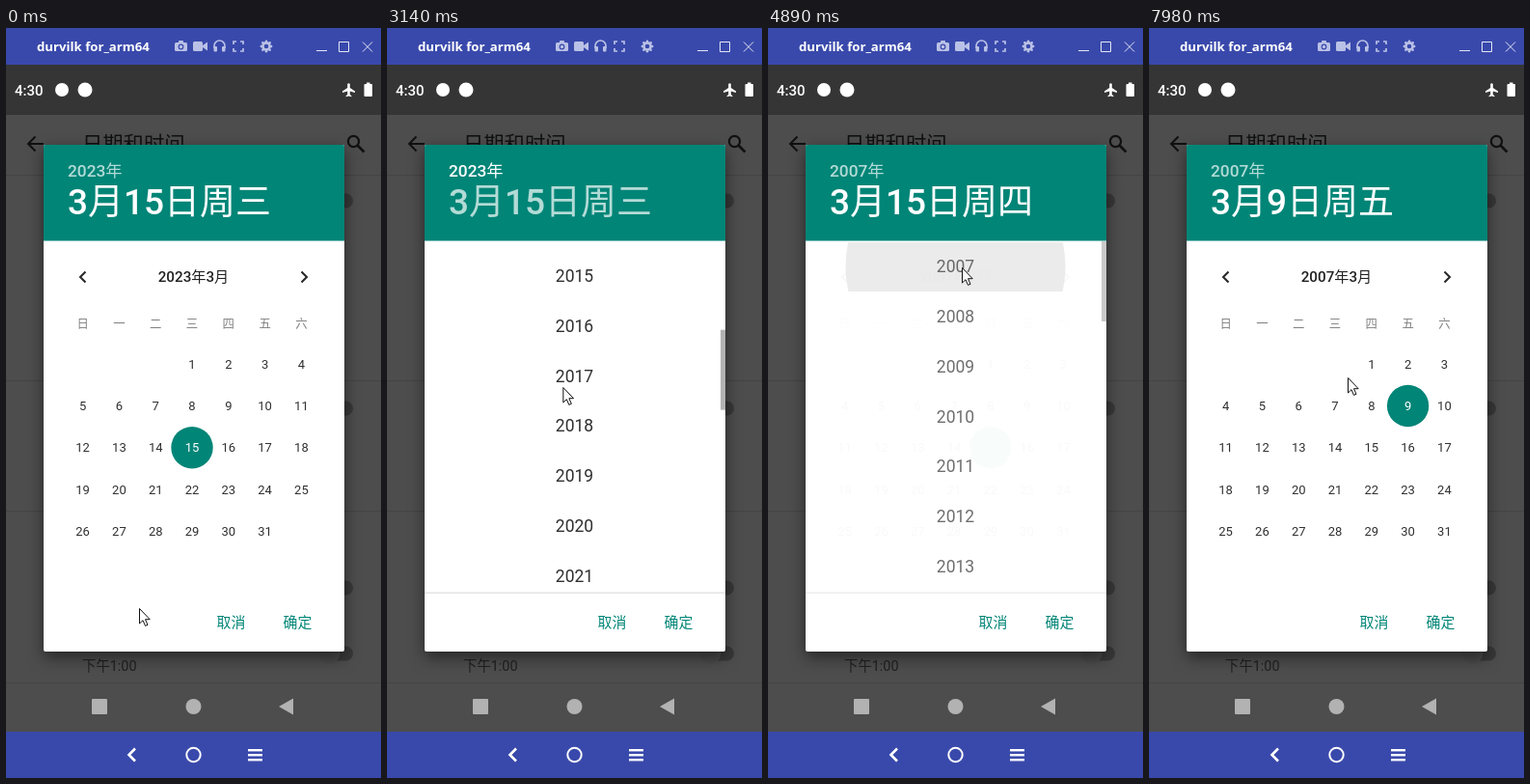
An HTML page with a canvas for the animation above (8000 ms loop, 389 px wide and 777 px high).

```html
<!DOCTYPE html>
<html lang="zh-CN">
<head>
<meta charset="utf-8">
<title>日期选择</title>
<style>
html, body { margin: 0; width: 100%; height: 100%; overflow: hidden; background: #4d4d4d; }
canvas { display: block; width: 389px; height: 777px; }
</style>
</head>
<body>
<canvas id="stage" width="389" height="777"></canvas>
<script>
const ctx = document.getElementById('stage').getContext('2d');
const LOOP = 8000, TEAL = '#008577', BLUE = '#3949ab';
const SANS = 'Roboto, "Noto Sans CJK SC", "Noto Sans CJK", sans-serif';
const WEEK = '日一二三四五六';
const YEAR_OPEN = 1130, YEAR_PICK = 4800, DAY_PICK = 7500, FADE = 300;

// time, x, y of the pointer tip
const POINTER = [
  [0, 138, 601], [130, 138, 601], [420, 160, 430], [870, 83, 141], [1480, 83, 141],
  [1830, 178, 300], [1950, 181, 330], [2170, 190, 720], [2240, 190, 800], [2420, 190, 800],
  [2590, 190, 520], [2900, 186, 400], [3410, 178, 339], [3620, 178, 339], [3950, 186, 600],
  [4150, 190, 600], [4560, 201, 248], [5840, 201, 248], [6000, 172, 142], [6200, 335, 300],
  [6350, 290, 376], [6520, 206, 290], [6730, 206, 290], [7020, 235, 360], [7300, 268, 391],
  [7600, 268, 391], [7960, 206, 362]
];
// time, scroll offset of the year list
const SCROLL = [[0, 740], [1950, 740], [2320, 386], [2590, 360], [2800, 360], [3350, 426], [3620, 426], [4180, 0]];
const PRESSES = [[1000, 1150], [1950, 2240], [3480, 3960], [4680, 4780], [7380, 7480]];

const clamp = v => Math.max(0, Math.min(1, v));
const span = (t, from, length) => clamp((t - from) / length);

function track(keys, t) {
  const i = keys.findIndex(k => k[0] > t);
  if (i < 0) return keys[keys.length - 1].slice(1);
  const a = keys[i - 1], b = keys[i];
  const p = (t - a[0]) / (b[0] - a[0]), e = p * p * (3 - 2 * p);
  return a.slice(1).map((v, n) => v + (b[n + 1] - v) * e);
}

function rect(x, y, w, h, color, r = 0) {
  ctx.fillStyle = color;
  ctx.beginPath();
  ctx.roundRect(x, y, w, h, r);
  ctx.fill();
}

function disc(x, y, r, color) {
  ctx.fillStyle = color;
  ctx.beginPath();
  ctx.arc(x, y, r, 0, 7);
  ctx.fill();
}

function ring(x, y, r, color, width) {
  ctx.strokeStyle = color;
  ctx.lineWidth = width;
  ctx.beginPath();
  ctx.arc(x, y, r, 0, 7);
  ctx.stroke();
}

function path(d, color, width) {
  const p = new Path2D(d);
  if (width) {
    ctx.strokeStyle = color;
    ctx.lineWidth = width;
    ctx.stroke(p);
  } else {
    ctx.fillStyle = color;
    ctx.fill(p);
  }
}

// y is the vertical middle of the digits
function label(s, x, y, size, color, align = 'center', weight = 400, family = SANS) {
  ctx.font = `${weight} ${size}px ${family}`;
  ctx.textAlign = align;
  ctx.fillStyle = color;
  ctx.fillText(s, x, y + size * 0.356);
}

function layer(alpha, draw) {
  if (alpha <= 0) return;
  ctx.save();
  ctx.globalAlpha = alpha;
  draw();
  ctx.restore();
}

function windowBar() {
  const icon = '#bac1e6';
  rect(0, 0, 389, 38, BLUE);
  label('durvilk for_arm64', 32, 19, 13.2, '#fff', 'left', 700, '"Open Sans", sans-serif');
  rect(175, 15, 13, 9, icon, 1.5);
  rect(179, 13, 5, 3, icon, 1);
  ring(181.5, 19.5, 2.3, BLUE, 1.2);
  rect(194, 14, 10, 10, icon, 1.5);
  path('M204 18 L209 14.5 V23.5 L204 20 Z', icon);
  path('M216 21 V18.5 A5.5 5.5 0 0 1 227 18.5 V21', icon, 1.6);
  rect(215.5, 19, 3.5, 5.5, icon, 1);
  rect(224, 19, 3.5, 5.5, icon, 1);
  path('M236 17 V14 H239 M243 14 H246 V17 M246 21 V24 H243 M239 24 H236 V21', icon, 1.7);
  ring(270, 19, 3.6, icon, 2.6);
  for (let i = 0; i < 8; i++) {
    const a = i * Math.PI / 4;
    disc(270 + 5.2 * Math.cos(a), 19 + 5.2 * Math.sin(a), 1.2, icon);
  }
  path('M322 23.5 H333 M345.5 14.5 H355.5 V24.5 H345.5 Z M370 14.5 L380 24.5 M380 14.5 L370 24.5', '#e4e6f5', 1);
}

function statusBar() {
  rect(0, 38, 389, 52, '#353535');
  label('4:30', 9, 64.5, 15, '#fff', 'left', 500);
  disc(58, 64, 7, '#fff');
  disc(82, 64, 7.5, '#fff');
  path('M354.2 58 Q355.5 56.4 356.8 58 V62 L362 65.4 V67 L356.8 65.5 V69 L358.4 70.2 V71.3 L355.5 70.5 L352.6 71.3 V70.2 L354.2 69 V65.5 L349 67 V65.4 L354.2 62 Z', '#fff');
  rect(371.5, 58, 8.5, 13, '#fff', 1);
  rect(374, 56.5, 3.5, 2, '#fff');
}

function settingsPage() {
  rect(0, 90, 389, 639, '#4d4d4d');
  for (const y of [152, 365, 500, 678]) rect(0, y, 389, 1, '#444');
  path('M39 120 H23 M30.5 112.5 L23 120 L30.5 127.5', '#111', 2);
  label('日期和时间', 79, 120, 21.3, '#111', 'left');
  ring(360.5, 117.5, 5.6, '#111', 2.2);
  path('M364.5 121.5 L371.5 128.5', '#111', 2.6);
  for (const y of [179, 394, 580, 648]) rect(330, y - 7.5, 30, 15, '#383838', 7.5);
  disc(336, 648, 10.5, '#4a4a4a');
  label('下午1:00', 79, 660.5, 14.4, '#202020', 'left');
  rect(89, 695, 16, 16, '#b2b2b2', 1);
  disc(194.5, 703, 8, '#b2b2b2');
  path('M283 703 L298 694.5 V711.5 Z', '#b2b2b2');
}

function bottomBar() {
  rect(0, 729, 389, 48, BLUE);
  path('M134 746.5 L127.5 753 L134 759.5', '#fff', 2.6);
  ring(194.5, 753, 7.2, '#fff', 2);
  for (const y of [747, 752, 757]) rect(251, y, 15, 2.4, '#fff');
}

function dialogPanel() {
  ctx.save();
  ctx.shadowColor = 'rgba(0,0,0,.5)';
  ctx.shadowBlur = 16;
  ctx.shadowOffsetY = 6;
  rect(39, 121, 312, 525, '#fff', 2);
  ctx.restore();
  rect(39, 121, 312, 99.5, TEAL, [2, 2, 0, 0]);
}

function header(t, year, day, first) {
  const choosing = t >= YEAR_OPEN && t < YEAR_PICK;
  const dim = 'rgba(255,255,255,.7)';
  const press = span(t, 1000, 80) * (1 - span(t, 1300, 300));
  rect(57, 129, 73, 39, `rgba(0,0,0,${0.13 * press})`, 2);
  label(year + '年', 64, 148, 17.3, choosing ? '#fff' : dim, 'left', 500);
  label(`3月${day}日周${WEEK[(first + day - 1) % 7]}`, 64, 180, 37, choosing ? dim : '#fff', 'left', 500);
}

function calendar(year, day, first) {
  const column = i => 79.6 + 37.8 * i;
  label(year + '年3月', 194.5, 258, 15.2, '#222', 'center', 500);
  path('M82.5 252.5 L77 258 L82.5 263.5 M306.5 252.5 L312 258 L306.5 263.5', '#2a2a2a', 2.1);
  [...WEEK].forEach((name, i) => label(name, column(i), 307, 12.4, '#808080'));
  for (let d = 1; d <= 31; d++) {
    const cell = first + d - 1;
    const x = column(cell % 7), y = 348.3 + 43.2 * Math.floor(cell / 7);
    if (d === day) disc(x, y, 21.7, TEAL);
    label(d, x, y, 13, d === day ? '#fff' : '#303030');
  }
}

function yearList(t) {
  const [offset] = track(SCROLL, t);
  ctx.beginPath();
  ctx.rect(39, 216, 312, 389);
  ctx.clip();
  rect(39, 584.5, 312, 1.2, '#dedede');
  if (t > 4680) {
    ctx.save();
    ctx.beginPath();
    ctx.rect(39, 222, 312, 51);
    ctx.clip();
    disc(194.5, 247, 114 * Math.sqrt(span(t, 4680, 210)), '#e3e3e3');
    ctx.restore();
  }
  for (let year = 2007; year <= 2037; year++) {
    const chosen = year === 2023;
    const extra = year > 2023 ? 11 : chosen ? 5.5 : 0;
    const y = 247 + 51.8 * (year - 2007) + extra - offset;
    if (y < 205 || y > 605) continue;
    label(year, 194.5, y, chosen ? 28.5 : 17.5, chosen ? TEAL : '#303030');
  }
  if (t > 1900) rect(346, 221 + offset * 0.2265, 5, 83, '#b3b3b3');
}

function pointer(t) {
  const [x, y] = track(POINTER, t);
  if (PRESSES.some(([from, to]) => t >= from && t < to)) disc(x, y, 12, 'rgba(255,246,50,.75)');
  ctx.save();
  ctx.translate(x, y);
  const arrow = 'M.5 .5 V16 L4 12.7 L6.5 18.4 L9 17.3 L6.5 11.7 H11.2 Z';
  path(arrow, '#fff');
  path(arrow, '#111', 1);
  ctx.restore();
}

function render(t) {
  const year = t < YEAR_PICK ? 2023 : 2007;
  const first = t < YEAR_PICK ? 3 : 4;
  const day = t < DAY_PICK ? 15 : 9;
  const open = span(t, YEAR_OPEN, FADE), close = span(t, YEAR_PICK, FADE);
  const calendarAlpha = t < YEAR_PICK ? 1 - open : close ** 3;
  const listAlpha = t < YEAR_PICK ? open ** 3.5 : 1 - close;

  settingsPage();
  windowBar();
  statusBar();
  bottomBar();
  dialogPanel();
  header(t, year, day, first);
  label('取消', 233.5, 616, 14.9, TEAL, 'center', 500);
  label('确定', 302.5, 616, 14.9, TEAL, 'center', 500);
  layer(calendarAlpha, () => calendar(year, day, first));
  layer(listAlpha, () => yearList(t));
  pointer(t);
}

const start = performance.now();
function tick() {
  render((performance.now() - start) % LOOP);
  requestAnimationFrame(tick);
}
tick();
</script>
</body>
</html>
```
